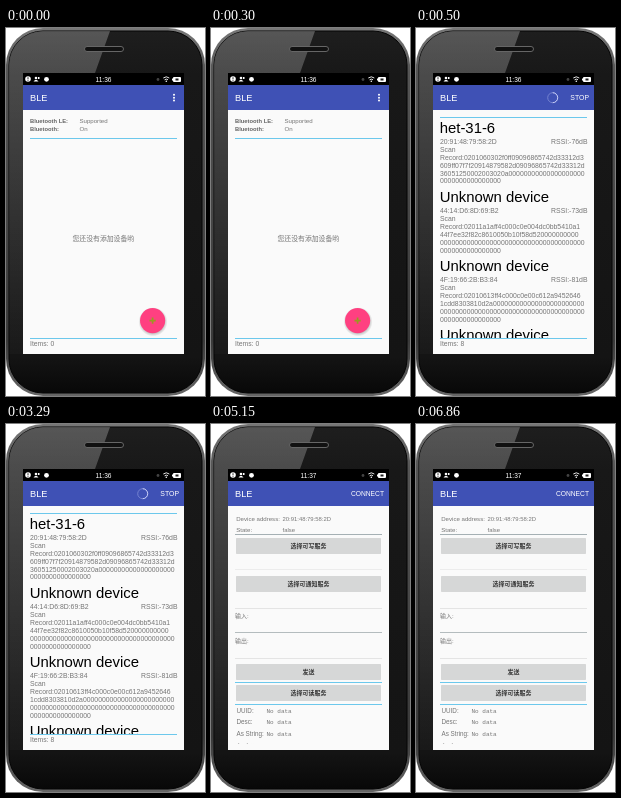
Write an HTML page that moves like this. It is 199x368 px and loops after 8 s.

```html
<!DOCTYPE html>
<html lang="zh">
<head>
<meta charset="utf-8">
<title>BLE</title>
<style>
html, body { margin: 0; width: 100%; height: 100%; overflow: hidden; background: #fff; }
svg { display: block; width: 100vw; height: 100vh; }
text { font-family: "Liberation Sans", "Noto Sans CJK SC", "Noto Sans CJK", sans-serif; white-space: pre; }
.mono { font-family: "Liberation Mono", monospace; }
</style>
</head>
<body>
<svg id="stage" viewBox="0 0 199 368">
  <defs>
    <linearGradient id="rim" x2="0" y2="1">
      <stop offset="0" stop-color="#777"/><stop offset=".12" stop-color="#555"/>
      <stop offset=".85" stop-color="#3a3a3a"/><stop offset="1" stop-color="#666"/>
    </linearGradient>
    <linearGradient id="face" x2="0" y2="1">
      <stop offset="0" stop-color="#1e1e1e"/><stop offset=".12" stop-color="#181818"/>
      <stop offset=".9" stop-color="#141414"/><stop offset="1" stop-color="#080808"/>
    </linearGradient>
    <linearGradient id="gloss" x2="0" y2="1">
      <stop offset="0" stop-color="#fff" stop-opacity=".25"/><stop offset="1" stop-color="#fff" stop-opacity=".02"/>
    </linearGradient>
    <radialGradient id="shade">
      <stop offset=".75" stop-opacity=".25"/><stop offset="1" stop-opacity="0"/>
    </radialGradient>
    <clipPath id="body"><rect x="3" y="3" width="193" height="362" rx="34"/></clipPath>
    <clipPath id="screen"><rect x="17" y="45" width="161" height="281"/></clipPath>
    <clipPath id="list"><rect x="17" y="82" width="161" height="228"/></clipPath>
    <clipPath id="form"><rect x="17" y="82" width="161" height="237.500"/></clipPath>
  </defs>
  <rect width="199" height="368" rx="37" fill="url(#rim)"/>
  <rect x="3" y="3" width="193" height="362" rx="34" fill="url(#face)" stroke="#050505"/>
  <path d="M3 3H104L89 45H17V326H3Z" fill="url(#gloss)" clip-path="url(#body)"/>
  <rect x="78.500" y="18.500" width="39" height="5" rx="2.500" fill="#111" stroke="#666"/>
  <g clip-path="url(#screen)" id="view"></g>
</svg>
<script>
const LOOP = 8000, LIST_AT = 500, FORM_AT = 5150;
const GREY = '#757575', BLUE = '#6cc8ec';

const text = (x, y, size, str, fill = GREY, extra = '') =>
  `<text x="${x}" y="${y}" font-size="${size}" fill="${fill}" ${extra}>${str}</text>`;
const rect = (x, y, w, h, fill, extra = '') =>
  `<rect x="${x}" y="${y}" width="${w}" height="${h}" fill="${fill}" ${extra}/>`;
const dot = (x, y, r, fill) => `<circle cx="${x}" cy="${y}" r="${r}" fill="${fill}"/>`;
const rule = (y, color = BLUE) => rect(24, y, 147, 1, color);
const END = 'text-anchor="end"', MID = 'text-anchor="middle"', BOLD = 'font-weight="bold"';

function chrome(clock) {
  return rect(17, 45, 161, 281, '#fafafa') + rect(17, 45, 161, 12, '#000') +
    rect(17, 57, 161, 25, '#3f51b5') +
    dot(22, 51, 2.8, '#fff') + rect(21.6, 49.2, .8, 2.2, '#000') + rect(21.6, 52, .8, .8, '#000') +
    dot(30, 50, 1.3, '#fff') + '<path d="M27.500 53.500q2.500-3.500 5 0z" fill="#fff"/>' + rect(32, 49, 1.5, 2, '#fff') +
    dot(40.5, 51.3, 2.4, '#fff') +
    text(97.5, 54, 6.6, clock, '#fff', MID) +
    dot(152, 51.5, 1.4, '#444') +
    '<path d="M157.300 50q3-2.400 6 0M158.600 51.800q1.700-1.400 3.400 0" fill="none" stroke="#fff" stroke-width=".9"/>' +
    dot(160.3, 53.2, .8, '#fff') +
    rect(167, 49, 8, 5, '#fff', 'rx="1"') + rect(166, 50.5, 1, 2, '#fff') +
    rect(169.5, 50.5, 3, 2, '#222') +
    text(24, 73, 9.2, 'BLE', '#fff');
}

function home() {
  return chrome('11:36') + [66.8, 69.7, 72.6].map(y => dot(168, y, 1, '#fff')).join('') +
    text(24, 94.7, 5.8, 'Bluetooth LE:', '#666', BOLD) + text(73.5, 94.7, 6.1, 'Supported') +
    text(24, 102.7, 5.8, 'Bluetooth:', '#666', BOLD) + text(73.5, 102.7, 6.1, 'On') +
    rule(110) + text(66.5, 213.3, 6.85, '您还没有添加设备哟') +
    rule(310) + text(24, 317.7, 6.8, 'Items: 0') +
    dot(147, 293.8, 14.6, 'url(#shade)') + dot(146.6, 292.6, 12.6, '#ff4081') +
    '<path d="M143.500 292.600h6.200M146.600 289.500v6.200" stroke="#9a9a20" stroke-width="1.700"/>';
}

const devices = [
  ['het-31-6', '20:91:48:79:58:2D', -76, ['0201060302f0ff09096865742d33312d3',
    '609ff07f7f20914879582d09096865742d33312d', '36051250002003020a']],
  ['Unknown device', '44:14:D6:8D:69:B2', -73, ['02011a1aff4c000c0e004dc0bb5410a1',
    '44f7ee32f82c8610050b10f58d52', '']],
  ['Unknown device', '4F:19:66:2B:B3:84', -81, ['02010613ff4c000c0e00c612a9452646',
    '1cdd8303810d2a', '']],
  ['Unknown device']
];

function record(data) {
  const [first, ...rest] = data;
  return ['Scan', 'Record:' + first, ...rest.map(d => d.padEnd(38, '0')), '0'.repeat(16)];
}

function scan() {
  const rows = devices.map(([name, mac, rssi, data], i) => {
    const y = 105 + 69.1 * i;
    const title = text(23.7, y, 14.9, name, '#000');
    if (!mac) return title;
    return title + text(24, y + 10.8, 6.9, mac) + text(171.5, y + 10.8, 6.9, `RSSI:${rssi}dB`, GREY, END) +
      record(data).map((line, k) => text(24, y + 19.2 + 7.8 * k, 6.85, line)).join('');
  }).join('');
  return chrome('11:36') +
    '<circle cx="136.700" cy="69.700" r="5" fill="none" stroke="#7482d0"/>' +
    '<path d="M136.700 64.700A5 5 0 0 1 136.700 74.700" fill="none" stroke="#c5cbf5"/>' +
    text(173, 72.2, 6.9, 'STOP', '#fff', END) + rule(89) +
    `<g clip-path="url(#list)">${rows}</g>` + rule(310) + text(24, 317.7, 6.8, 'Items: 8');
}

function form() {
  const button = (y, label) => rect(25, y, 145, 16, '#d6d7d7', 'rx=".8"') +
    text(97.5, y + 10.3, 6, label, '#333', MID + ' ' + BOLD);
  const fields = ['UUID:', 'Desc:', 'As String:', 'As Array:'].map((label, i) => {
    const y = 288.7 + 11.6 * i;
    return text(25.5, y, 6.3, label) + text(55.5, y, 6, 'No data', GREY, 'class="mono"');
  }).join('');
  return chrome('11:37') + text(173, 72.2, 6.7, 'CONNECT', '#fff', END) +
    text(25.2, 96.7, 6.1, 'Device address:') + text(71.5, 96.7, 5.9, '20:91:48:79:58:2D') +
    text(25.2, 108, 6.1, 'State:') + text(71.5, 108, 5.9, 'false') +
    rule(110, '#a5b0b4') + button(114, '选择可写服务') +
    rule(145, '#ececec') + button(152, '选择可通知服务') +
    rule(184, '#e4e4e4') + text(24, 193.7, 6, '输入:') +
    rule(208, '#b4bcbe') + text(24, 218.7, 6, '输出:') + rule(234, '#e4e4e4') +
    button(240, '发送') + rule(258) + button(261, '选择可读服务') + rule(280) +
    `<g clip-path="url(#form)">${fields}</g>`;
}

const view = document.getElementById('view');
let shown;
function draw(t) {
  const next = t < LIST_AT ? home : t < FORM_AT ? scan : form;
  if (next !== shown) view.innerHTML = (shown = next)();
}
const start = performance.now();
function tick(now) {
  draw(Math.max(0, now - start) % LOOP);
  requestAnimationFrame(tick);
}
draw(0);
requestAnimationFrame(tick);
</script>
</body>
</html>
```
